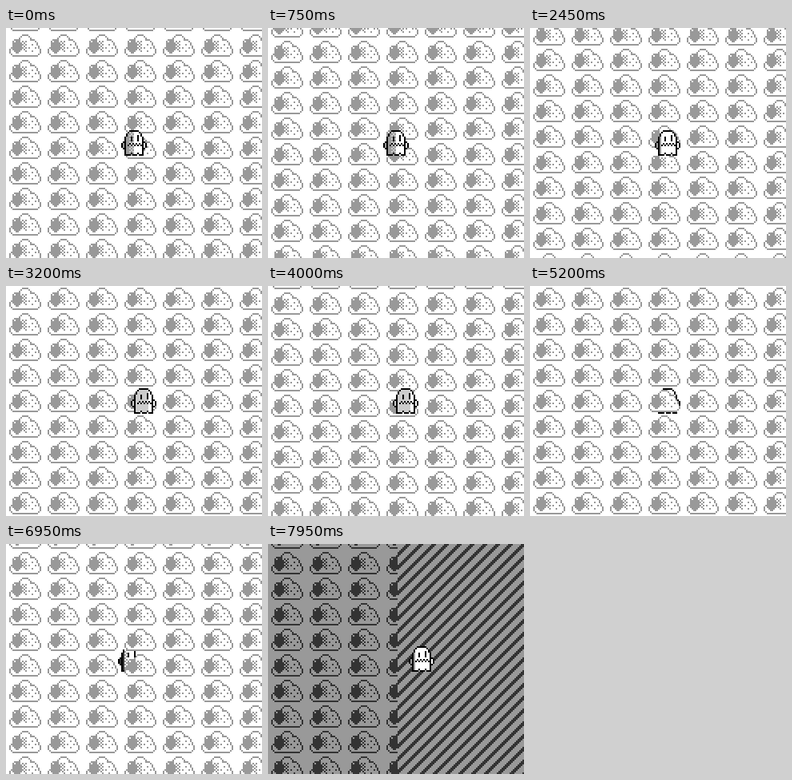
These frames come from a looping animation (320 by 288 pixels, 8 s). An HTML page with a canvas:

```html
<!DOCTYPE html>
<html lang="en">
<head>
<meta charset="utf-8">
<title>Ghost above the clouds</title>
<style>
  html, body { margin: 0; width: 100%; height: 100%; overflow: hidden; background: #fff; }
  canvas { display: block; width: 320px; height: 288px; image-rendering: pixelated; }
</style>
</head>
<body>
<canvas id="stage" width="160" height="144"></canvas>
<script>
const LOOP = 8000, TICK = 50, NIGHT = 7350;
const WHITE = '#fff', PALE = '#ccc', GRAY = '#999', DARK = '#333', BLACK = '#000';
const ctx = document.getElementById('stage').getContext('2d');

// Ghost position as [time, x], and look as [start time, name].
const PATH = [[0, 72], [850, 72], [1500, 58], [2450, 78], [5200, 78],
              [6200, 70], [6950, 70], [7950, 88], [8000, 88]];
const LOOKS = [[0, 'shaded'], [2000, 'white'], [3000, 'pale'], [5000, 'rightRim'],
               [5500, 'shaded'], [6750, 'leftRim'], [7050, 'shaded'], [NIGHT, 'white']];

const CLOUD = [[2, 13], [17, 13], [19, 11], [19, 9], [17, 6], [17, 5], [15, 3],
               [13, 3], [12, 1], [11, 0], [8, 0], [6, 2], [6, 3], [3, 3], [2, 4],
               [2, 7], [0, 9], [0, 11], [2, 13]];

function makeSprite(w, h, paint) {
  const canvas = document.createElement('canvas');
  canvas.width = w;
  canvas.height = h;
  const c = canvas.getContext('2d');
  paint((x, y, color) => {
    c.fillStyle = color;
    c.fillRect(x, y, 1, 1);
  });
  return canvas;
}

function eachCell(w, h, visit) {
  for (let y = 0; y < h; y++) for (let x = 0; x < w; x++) visit(x, y);
}

function line(dot, [x0, y0], [x1, y1], color) {
  const n = Math.max(Math.abs(x1 - x0), Math.abs(y1 - y0));
  for (let i = 0; i <= n; i++) {
    dot(Math.round(x0 + (x1 - x0) * i / n), Math.round(y0 + (y1 - y0) * i / n), color);
  }
}

// Solid on the left, then a checker, then scattered dots.
function cloudTone(x, y) {
  if (Math.hypot(x - 4.5, (y - 7.5) * 0.75) < 2.8) return true;
  if (x > 5 && x < 11 && y > 3 && y < 10) return (x + y) % 2 === 0;
  return x > 9 && x < 17 && y > 5 && y < 12 && y % 2 === 0 && (x + y) % 4 === 0;
}

const makeCloud = color => makeSprite(20, 14, dot => {
  for (let i = 1; i < CLOUD.length; i++) line(dot, CLOUD[i - 1], CLOUD[i], color);
  eachCell(20, 13, (x, y) => {
    if (cloudTone(x, y)) dot(x, y, color);
  });
});

function inGhost(x, y) {
  if (y < 0 || y > 15) return false;
  if (y === 15 && (x === 6 || x === 10)) return false;
  let left = Math.max(2, 5 - y);
  if (y === 3) left = 3;
  if (y > 6 && y < 12) left = y > 7 && y < 11 ? 0 : 1;
  return x >= left && x <= 15 - left;
}

const onRim = (x, y) => inGhost(x, y) &&
  !(inGhost(x - 1, y) && inGhost(x + 1, y) && inGhost(x, y - 1) && inGhost(x, y + 1));
const onArm = (x, y) => y > 6 && y < 12 && (x === 2 || x === 13);

const FILL = {
  white: x => x < 4 ? GRAY : WHITE,
  pale: x => x > 10 ? WHITE : PALE,
  shaded: (x, y) => x < 5 ? GRAY : x < 8 ? ((x + y) % 2 ? GRAY : PALE) : WHITE,
  rightRim: () => null,
  leftRim: (x, y) => x < 4 ? DARK : x < 6 && (x + y) % 2 ? GRAY : null
};
const RIM = {
  rightRim: (x, y) => (x > 4 && y < 3) || (x > 11 && y < 11) || y === 15,
  leftRim: x => x < 4
};

const makeGhost = look => makeSprite(16, 16, dot => {
  const showRim = RIM[look] || (() => true);
  eachCell(16, 16, (x, y) => {
    if (onRim(x, y) || (onArm(x, y) && look !== 'rightRim')) {
      if (showRim(x, y)) dot(x, y, BLACK);
    } else if (inGhost(x, y)) {
      const color = FILL[look](x, y);
      if (color) dot(x, y, color);
    }
  });
  if (look === 'rightRim') return;
  line(dot, [6, 4], [6, 6], BLACK);
  line(dot, [10, 3], [10, 6], BLACK);
  if (look === 'leftRim') return;
  for (let x = 4; x < 13; x++) dot(x, 9 - x % 2, BLACK);
});

const clouds = { day: makeCloud(GRAY), night: makeCloud(DARK) };
const ghosts = Object.fromEntries(Object.keys(FILL).map(look => [look, makeGhost(look)]));
const stripes = makeSprite(79, 144, dot => eachCell(79, 144, (x, y) => {
  dot(x, y, (x + y + 3) % 8 < 3 ? DARK : GRAY);
}));

function ghostX(t) {
  const i = PATH.findIndex(([end]) => end > t);
  const [t0, x0] = PATH[i - 1], [t1, x1] = PATH[i];
  return Math.round(x0 + (x1 - x0) * (t - t0) / (t1 - t0));
}

function draw(t) {
  const night = t >= NIGHT;
  const scroll = Math.floor(t / 62.5 + 1e-6);
  const top = (((4 - scroll) % 16) + 16) % 16 - 16;

  ctx.fillStyle = night ? GRAY : WHITE;
  ctx.fillRect(0, 0, 160, 144);
  const cloud = night ? clouds.night : clouds.day;
  for (let y = top; y < 144; y += 16) {
    for (let x = 2; x < 160; x += 24) ctx.drawImage(cloud, x, y);
  }
  if (night) ctx.drawImage(stripes, 81, 0);

  const look = LOOKS.filter(([start]) => start <= t).pop()[1];
  ctx.drawImage(ghosts[look], ghostX(t), 64);
}

function play() {
  const t = performance.now() % LOOP;
  draw(Math.floor(t / TICK) * TICK);
  requestAnimationFrame(play);
}
play();
</script>
</body>
</html>
```
